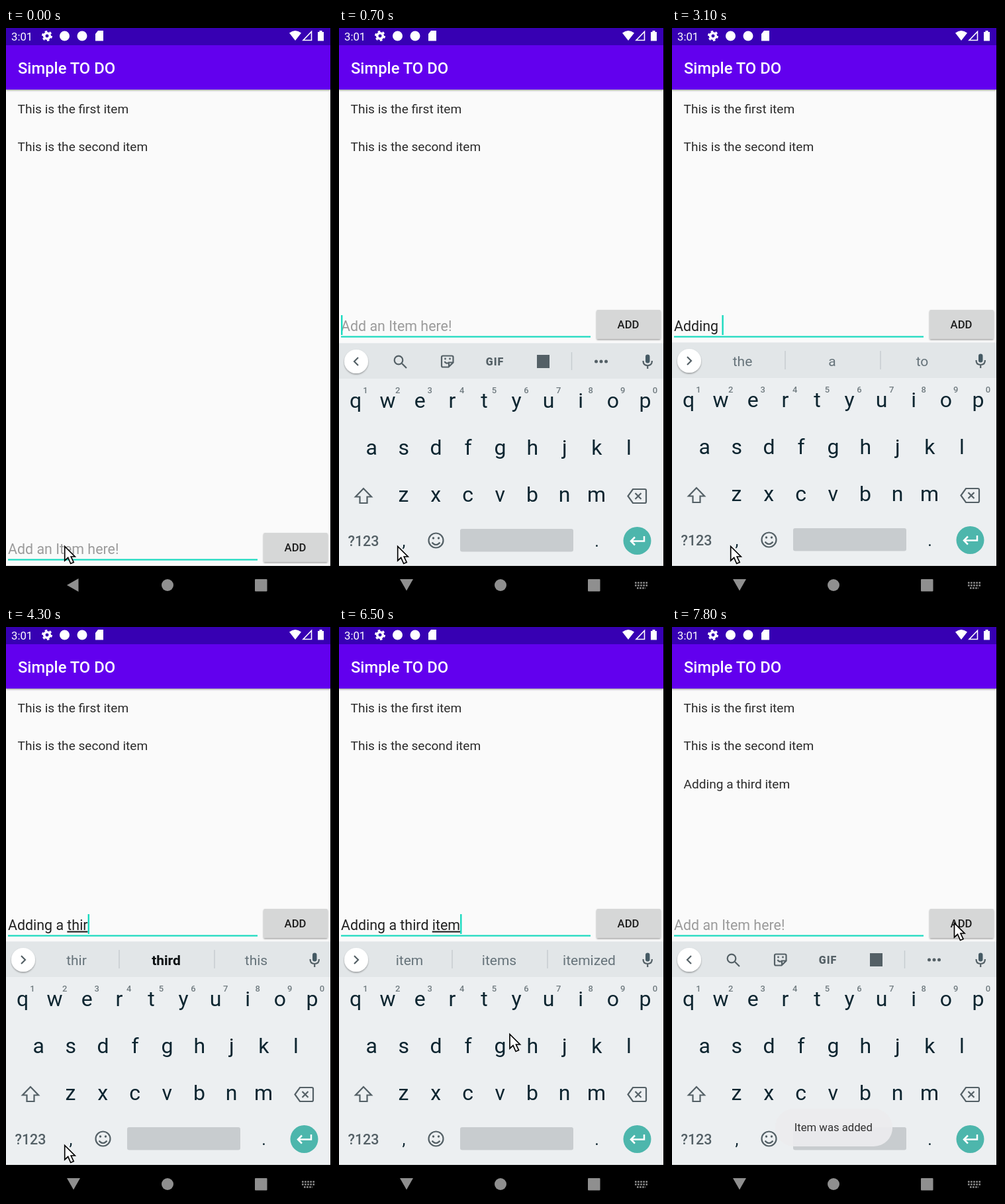
Recreate the animation shown at these times as an HTML page. Size 494 by 863 pixels, loop 8000 ms.

```html
<!DOCTYPE html>
<html lang="en">
<head>
<meta charset="utf-8">
<style>
  html, body { margin: 0; height: 100%; overflow: hidden; background: #000; }
  svg { display: block; }
  text { font-family: Roboto, sans-serif; white-space: pre; }
  .mid { text-anchor: middle; }
  .medium { font-weight: 500; }
  .line { fill: none; stroke: #546066; stroke-width: 2.2; }
  #typed tspan { text-decoration: underline; text-decoration-thickness: 1.3px; text-decoration-skip-ink: none; }
</style>
</head>
<body>
<svg width="494" height="863" viewBox="0 0 494 863">
  <defs>
    <clipPath id="screen"><rect width="490" height="813"/></clipPath>
    <clipPath id="buttonClip"><rect x="389" y="763" width="97" height="44" rx="2"/></clipPath>
    <filter id="shadow" x="-10%" y="-30%" width="120%" height="170%">
      <feDropShadow dx="0" dy="1.5" stdDeviation="1.2" flood-opacity=".35"/>
    </filter>
  </defs>
  <rect width="494" height="863"/>

  <g clip-path="url(#screen)">
    <rect width="490" height="813" fill="#fafafa"/>
    <rect y="26" width="490" height="67" fill="#6200ee" filter="url(#shadow)"/>
    <rect width="490" height="26" fill="#3700b3"/>
    <text x="18" y="69" font-size="23.8" class="medium" fill="#fff">Simple TO DO</text>
    <g fill="#fff">
      <text x="8" y="18.5" font-size="16.7">3:01</text>
      <circle cx="62" cy="12" r="4.3" fill="none" stroke="#fff" stroke-width="3.6"/>
      <circle cx="62" cy="12" r="6.8" fill="none" stroke="#fff" stroke-width="2.4" stroke-dasharray="3.56"/>
      <circle cx="88.500" cy="12" r="7.500"/>
      <circle cx="115" cy="12" r="7.500"/>
      <path d="M135 9l4-5h8v15.500h-12z"/>
      <path d="M428 7.500q9-7 18 0l-9 11.500z"/>
      <path d="M449 18.500h12.500v-13z" fill="none" stroke="#fff" stroke-width="1.600"/>
      <path d="M471 6h2.500v-2h4v2h2.500v13.500h-9z"/>
    </g>
    <g font-size="19.1" fill="#2b2b2b">
      <text x="17.500" y="129">This is the first item</text>
      <text x="17.500" y="186.300">This is the second item</text>
      <text id="added" x="17.500" y="243.600">Adding a third item</text>
    </g>

    <g id="inputBar">
      <rect x="3" y="802.500" width="377" height="2.200" fill="#18dabf"/>
      <text id="hint" x="3" y="794.500" font-size="21.4" fill="#9b9b9b">Add an Item here!</text>
      <text id="typed" x="3" y="794.500" font-size="21.4" fill="#212121"></text>
      <rect id="caret" y="771" width="2.400" height="30" fill="#18dabf"/>
      <rect x="389" y="763" width="97" height="44" rx="2" fill="#d6d7d7" filter="url(#shadow)"/>
      <g clip-path="url(#buttonClip)"><circle id="ripple" cx="428" cy="786"/></g>
      <text x="437" y="791" font-size="16.7" class="mid medium" fill="#1d1d1d">ADD</text>
    </g>

    <g id="keyboard">
      <rect y="475.500" width="490" height="345" fill="#eceff1"/>
      <rect y="475.500" width="490" height="53.500" fill="#e2e6e8"/>
      <circle cx="26" cy="503" r="18" fill="#fff" filter="url(#shadow)"/>
      <path id="chevron" class="line" d="M29 497l-6 6 6 6"/>
      <rect x="463" y="492.500" width="6.500" height="13" rx="3.200" fill="#455a64"/>
      <path class="line" stroke-width="1.800" d="M459.500 502q0 7 6.700 7t6.700-7M466.200 509v5"/>
      <g id="tools" fill="#546066">
        <circle class="line" cx="90" cy="501" r="6.300"/><path class="line" d="M95 506l7 7"/>
        <path class="line" d="M157 494.500h13.500q2 0 2 2v8l-7 7h-8.500q-2 0-2-2v-13q0-2 2-2zM172 504.500h-6v6M159.500 503q2 4 6 2"/>
        <circle cx="160.500" cy="499" r="1.400"/><circle cx="167.500" cy="499" r="1.400"/>
        <text x="235.500" y="508.500" font-size="16" font-weight="900" letter-spacing="1" class="mid">GIF</text>
        <rect x="299" y="493" width="19" height="20"/>
        <path d="M351.500 489v27" stroke="#c7cdd0" stroke-width="1.500"/>
        <circle cx="388.500" cy="503" r="2.500"/><circle cx="396" cy="503" r="2.500"/><circle cx="403.500" cy="503" r="2.500"/>
      </g>
      <g id="suggestions" font-size="21" class="mid">
        <path d="M171 488v28M315 488v28" stroke="#c7cdd0" stroke-width="1.500"/>
        <text x="106.500" y="511"></text><text x="242" y="511"></text><text x="378" y="511"></text>
      </g>
      <g id="keys" fill="#0d2530" class="mid" font-size="32"></g>
      <path class="line" d="M37 695l-12 12.500h6.500v9.500h11v-9.500h6.500z"/>
      <path class="line" d="M444 696h18q2 0 2 2v17q0 2-2 2h-18l-7.500-10.500zM447.500 702l9 9m0-9l-9 9"/>
      <text x="37" y="781.500" font-size="21.5" class="mid medium" fill="#546066">?123</text>
      <circle class="line" cx="146.500" cy="773.500" r="11"/>
      <path class="line" d="M140.500 776.500q6 7 12 0"/>
      <circle cx="142.500" cy="770" r="1.700" fill="#546066"/><circle cx="150.500" cy="770" r="1.700" fill="#546066"/>
      <rect x="183" y="756" width="171" height="34.500" rx="3" fill="#c8cccf"/>
      <circle cx="450.500" cy="774" r="21" fill="#4db6ac"/>
      <path d="M461 767v7.500h-20M447 768.500l-6 6 6 6" fill="none" stroke="#fff" stroke-width="2.500"/>
    </g>

    <g id="toast">
      <rect x="156" y="728" width="177" height="57" rx="28" fill="#ececee" fill-opacity=".93"/>
      <text x="243.800" y="762" font-size="16.7" class="mid" fill="#303030">Item was added</text>
    </g>
  </g>

  <g fill="#8f8f8f">
    <path id="back" d="M92 842l17.500-10v20z"/>
    <circle cx="244" cy="842" r="9"/>
    <rect x="376" y="833" width="18.500" height="18.500" rx="1"/>
    <path id="keyIcon" d="M447 838.500h19M447 842.500h19M450 846.500h13" stroke="#8f8f8f" stroke-width="2.500" stroke-dasharray="2.600 1.500"/>
  </g>
  <path id="mouse" d="M0 0v21.500l5-4.500 4 9 4.500-2-4-8.500h6z" fill="#fff" stroke="#000" stroke-width="1.700"/>
</svg>

<script>
const $ = id => document.getElementById(id);
const LOOP = 8000;

// time, field text, suggestions
const edits = [
  [300, '', ''],
  [2000, 'A', 'A|And|All'],
  [2400, 'Ad', 'Ad|Add|Address'],
  [2600, 'Add', 'Add|Added|Address'],
  [2700, 'Addi', 'Addi|Adding|Additional'],
  [2900, 'Adding', 'Adding|Addition|Additives'],
  [3100, 'Adding ', 'the|a|to'],
  [3300, 'Adding a', 'a|an|and'],
  [3400, 'Adding a ', 'few|little|new'],
  [3900, 'Adding a t', 't|the|that'],
  [4000, 'Adding a th', 'th|the|this'],
  [4200, 'Adding a thi', 'thi|think|this'],
  [4300, 'Adding a thir', 'thir|*third|this'],
  [4500, 'Adding a third', 'third|thirds|thirdly'],
  [4600, 'Adding a third ', 'grade|party|time'],
  [4800, 'Adding a third it', 'it|is|item'],
  [4900, 'Adding a third ite', 'ite|items|item'],
  [5100, 'Adding a third item', 'item|items|itemized'],
  [7300, '', '']
];

function addKey(label, x, y, attrs = '') {
  $('keys').innerHTML += `<text x="${x}" y="${y}" ${attrs}>${label}</text>`;
}
[['qwertyuiop', 25], ['asdfghjkl', 49.2], ['zxcvbnm', 97.5]].forEach(([row, x], r) =>
  [...row].forEach((c, i) => addKey(c, x + 48.6 * i, 572.5 + 71 * r)));
[...'1234567890'].forEach((c, i) =>
  addKey(c, 40 + 48.6 * i, 551, 'font-size="13" fill="#707b80" class="medium"'));
addKey(',', 98, 783, 'font-size="25"');
addKey('.', 389.5, 783, 'font-size="25"');

const show = (id, on) => $(id).setAttribute('display', on ? 'inline' : 'none');
const set = (id, name, value) => $(id).setAttribute(name, value);
const clamp = v => Math.max(0, Math.min(1, v));
const words = [...document.querySelectorAll('#suggestions text')];

function drawField(t) {
  const [time, text, options] = edits.findLast(e => e[0] <= t) || [0, '', ''];
  const split = text.lastIndexOf(' ') + 1;
  $('typed').innerHTML = text.slice(0, split) + `<tspan>${text.slice(split)}</tspan>`;
  show('hint', !text);
  show('caret', t >= 300 && (t - time) % 1000 < 500);
  set('caret', 'x', 3 + (text ? $('typed').getComputedTextLength() : 0));

  show('tools', !text);
  show('suggestions', text);
  set('chevron', 'd', text ? 'M23 497l6 6-6 6' : 'M29 497l-6 6 6 6');
  const list = options.split('|');
  words.forEach((word, i) => {
    const label = list[i] || '', best = label[0] === '*';
    word.textContent = label.replace('*', '');
    word.setAttribute('fill', best ? '#0b0f11' : '#66737a');
    word.setAttribute('font-weight', best ? 700 : 400);
  });
}

function draw(t) {
  const open = t >= 600;
  show('keyboard', open);
  show('keyIcon', open);
  set('keyboard', 'transform', `translate(0 ${t < 700 ? 28 : t < 800 ? 1 : 0})`);
  set('keyboard', 'opacity', t < 700 ? .7 : 1);
  set('inputBar', 'transform', `translate(0 ${open ? -337 : 0})`);
  set('back', 'd', open ? 'M92 833h20l-10 17.500z' : 'M92 842l17.500-10v20z');
  drawField(t);
  show('added', t >= 7300);

  const press = clamp((t - 6900) / 300);
  set('ripple', 'r', t < 7000 ? 0 : t <= 7200 ? 34 * press : 34 + (t - 7200) * .12);
  set('ripple', 'opacity', .1 * clamp((7700 - t) / 400));
  set('toast', 'opacity', clamp((t - 7300) / 400));

  const p = clamp((t - 6200) / 600), ease = p * p * (3 - 2 * p);
  const startX = t < 5700 ? 88.7 : 89.5;
  set('mouse', 'transform', `translate(${startX + (426.5 - startX) * ease} ${783.5 - 336 * ease})`);
}

function tick(now) {
  draw(Math.floor(now % LOOP / 100) * 100);
  requestAnimationFrame(tick);
}
requestAnimationFrame(tick);
</script>
</body>
</html>
```
